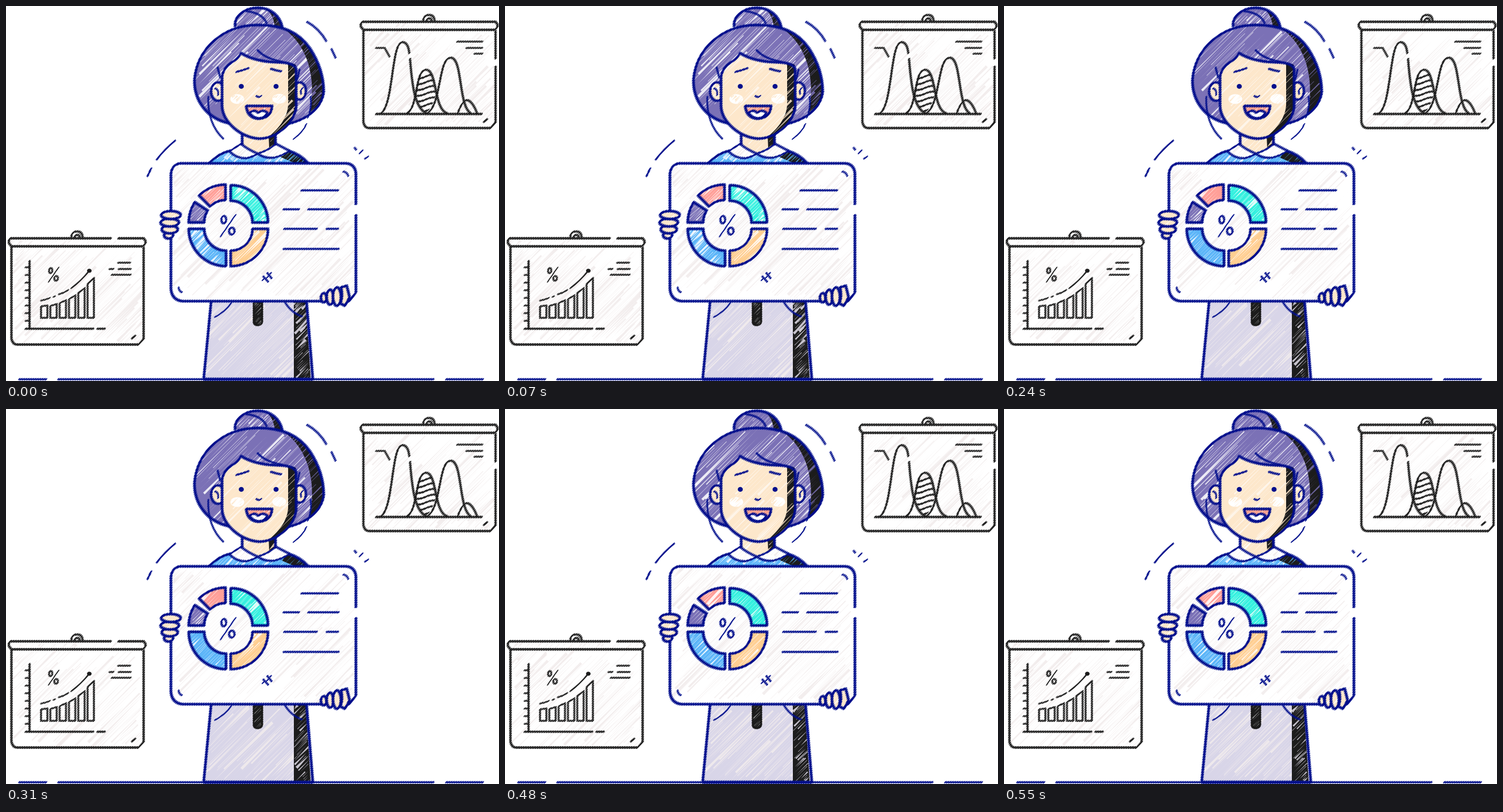
Recreate the animation shown at these times as an HTML page with a canvas. Size 858 by 653 pixels, loop 0.6 s.

```html
<!DOCTYPE html>
<html lang="en">
<head>
<meta charset="utf-8">
<title>Scribbled presentation</title>
<style>
html, body { margin: 0; width: 100%; height: 100%; overflow: hidden; background: #fff; }
canvas { display: block; width: 858px; height: 653px; }
</style>
</head>
<body>
<canvas id="stage" width="858" height="653"></canvas>
<script>
const ctx = document.getElementById('stage').getContext('2d');
const STEP = 120, STEPS = 5;
const NAVY = '#000f8c', INK = '#1c1c1c', HAIR = '#7b71b6', SKIN = '#fde7cb';
const BLUE = '#5cb5f8', PALE = '#f1ebeb', WHITE = '#fff';
const density = [1.3, 1, .95, .95, 1.05];
let rand, busy;

function seeded(a) {
  return () => {
    a = a + 0x6D2B79F5 | 0;
    let t = Math.imul(a ^ a >>> 15, 1 | a);
    t = t + Math.imul(t ^ t >>> 7, 61 | t) ^ t;
    return ((t ^ t >>> 14) >>> 0) / 4294967296;
  };
}

// Diagonal stripes give every pen line its serrated edge.
function stripes(color) {
  const c = document.createElement('canvas');
  c.width = c.height = 4;
  const g = c.getContext('2d');
  g.strokeStyle = color;
  g.lineWidth = 1.7;
  for (let k = -4; k <= 8; k += 4) {
    g.beginPath();
    g.moveTo(k - 4, 8);
    g.lineTo(k + 8, -4);
    g.stroke();
  }
  return ctx.createPattern(c, 'repeat');
}
const pens = { [NAVY]: stripes(NAVY), [INK]: stripes(INK) };

function line(d, color = NAVY, w = 4) {
  const p = new Path2D(d);
  ctx.lineCap = 'butt';
  ctx.lineJoin = 'round';
  ctx.strokeStyle = color;
  ctx.lineWidth = Math.max(1.2, w - 1.4);
  ctx.stroke(p);
  // Sweep the stripes along their own direction, so the teeth lean at 45°.
  ctx.strokeStyle = pens[color];
  ctx.lineWidth = w;
  for (const shift of [-.8, .8]) {
    ctx.save();
    ctx.translate(shift, -shift);
    ctx.stroke(p);
    ctx.restore();
  }
}

function bounds(d) {
  const n = d.match(/-?\d+(\.\d+)?/g).map(Number);
  const xs = n.filter((_, i) => i % 2 === 0), ys = n.filter((_, i) => i % 2);
  return [Math.min(...xs), Math.min(...ys), Math.max(...xs), Math.max(...ys)];
}

// Flat colour with fine tapered diagonal gaps, re-drawn at every step.
function fill(d, color, gap = WHITE, amount = 1, alpha = .85) {
  const [x0, y0, x1, y1] = bounds(d), path = new Path2D(d);
  ctx.save();
  ctx.fillStyle = color;
  ctx.fill(path);
  ctx.clip(path);
  ctx.fillStyle = gap;
  ctx.globalAlpha = alpha;
  const pitch = 4.6 / (amount * busy);
  for (let s = x0 + y0; s < x1 + y1; s += pitch * (.4 + 1.2 * rand())) {
    const a = Math.max(x0, s - y1), b = Math.min(x1, s - y0);
    const len = (b - a) * (.45 + .55 * rand());
    const from = a + (b - a - len) * rand();
    const w = .25 + 1.6 * rand() ** 4;
    const [thin, wide] = rand() < .5 ? [from, from + len] : [from + len, from];
    ctx.beginPath();
    ctx.moveTo(thin, s - thin);
    ctx.lineTo(wide - w, s - wide - w);
    ctx.lineTo(wide + w, s - wide + w);
    ctx.fill();
  }
  ctx.restore();
}

function shape(d, color, gap, amount, pen = NAVY, w = 4) {
  fill(d, color, gap, amount);
  line(d, pen, w);
}

const seg = (x1, y1, x2, y2) => `M${x1} ${y1} L${x2} ${y2}`;
const row = (y, ...xs) => {
  let d = '';
  for (let i = 0; i < xs.length; i += 2) d += seg(xs[i], y, xs[i + 1], y);
  return d;
};

function oval(x, y, rx, ry) {
  const k = .552, a = rx * k, b = ry * k;
  return `M${x - rx} ${y} C${x - rx} ${y - b} ${x - a} ${y - ry} ${x} ${y - ry}` +
    ` C${x + a} ${y - ry} ${x + rx} ${y - b} ${x + rx} ${y}` +
    ` C${x + rx} ${y + b} ${x + a} ${y + ry} ${x} ${y + ry}` +
    ` C${x - a} ${y + ry} ${x - rx} ${y + b} ${x - rx} ${y}Z`;
}

function dot(x, y, rx, ry, color) {
  ctx.fillStyle = color;
  ctx.fill(new Path2D(oval(x, y, rx, ry)));
}

function sector(x, y, from, to, R = 65, r = 38) {
  const pts = [];
  const add = (rad, deg) => {
    const t = deg * Math.PI / 180;
    pts.push((x + rad * Math.cos(t)).toFixed(1) + ' ' + (y + rad * Math.sin(t)).toFixed(1));
  };
  for (let i = 0; i <= 16; i++) add(R, from + (to - from) * i / 16);
  for (let i = 16; i >= 0; i--) add(r, from + (to - from) * i / 16);
  return 'M' + pts.join(' L') + 'Z';
}

function percent(x, y, s, pen, w) {
  line(oval(x - 7 * s, y - 10 * s, 4.2 * s, 6.5 * s), pen, w);
  line(oval(x + 7 * s, y + 10 * s, 4.8 * s, 6 * s), pen, w);
  line(seg(x - 13 * s, y + 20 * s, x + 14 * s, y - 19 * s), pen, w - 1);
}

function bun() {
  const d = 'M399 36 C396 20 413 3 438 3 C460 3 477 17 481 38 L440 33Z';
  fill(d, HAIR);
  fill('M454 5 C468 11 478 22 481 38 L468 36 C466 22 462 14 454 5Z', INK, HAIR, .7);
  line('M399 36 C396 20 413 3 438 3 C460 3 477 17 481 38');
  line('M418 9 Q447 12 454 31', NAVY, 2.5);
}

function hair() {
  const d = 'M388 204 C350 196 327 165 328 128 C333 72 380 33 438 33 ' +
    'C482 33 510 46 529 74 C546 100 553 126 553 150 C549 180 520 200 487 206Z';
  fill(d, HAIR);
  fill('M484 40 C510 48 526 66 538 92 C548 112 553 132 553 152 L547 172 ' +
    'L528 190 C535 155 534 128 526 100 C518 75 505 55 484 40Z', INK, HAIR, .7);
  line(d);
}

function head() {
  shape(oval(369, 149, 12, 16), SKIN, WHITE, .4, NAVY, 3.6);
  shape(oval(511, 148, 11, 15), SKIN, WHITE, .4, NAVY, 3.6);
  line('M363 143 Q371 145 369 156 M517 142 Q511 146 514 154', NAVY, 2);
  // Neck and clothes sit below the chin.
  fill('M353 274 Q371 255 398 248 L486 248 Q511 256 526 274Z', BLUE, WHITE, 1.2);
  fill('M478 263 L495 252 Q513 260 525 274 L503 274Z', INK, BLUE, .6);
  line('M353 274 Q371 256 390 252 M491 252 Q512 258 526 274');
  fill('M411 215 L469 215 L469 242 L438 257 L411 242Z', SKIN, WHITE, .4);
  fill('M457 222 L469 215 L469 242 L458 247Z', INK, SKIN, .4);
  shape('M409 240 L389 253 Q401 266 419 265 Q431 262 438 257 Q450 266 467 264 ' +
    'Q483 260 493 252 L470 240 Q456 252 438 257 Q421 250 409 240Z', WHITE, PALE, .7, NAVY, 3);
  line('M411 219 L411 242 M469 219 L469 242');

  const face = 'M376 122 Q379 107 393 98 Q404 92 409 82 Q433 97 472 98 ' +
    'Q502 98 505 110 L505 176 C501 206 469 231 440 231 C406 228 377 201 376 174Z';
  fill(face, SKIN, WHITE, .65, .6);
  fill('M491 99 L504 102 L505 176 C501 202 476 226 454 230 C474 215 490 195 491 172Z', INK, SKIN, .7);
  line(face);
  line('M437 76 Q451 92 481 97 M368 106 L373 125 M511 110 L507 128', NAVY, 2.5);

  fill(oval(402.5, 162, 12, 8.5), WHITE, SKIN, .9);
  fill(oval(475.5, 161.5, 12, 8.5), WHITE, SKIN, .9);
  line('M400 115 L411 112 L423 108 M460 109 L470 112 L480 114', NAVY, 3);
  dot(409.5, 140, 4.4, 4.2, NAVY);
  dot(470, 140, 4.4, 4.2, NAVY);
  line('M435 156 Q440 161 445 156', NAVY, 2.2);
  const mouth = 'M418 174 L463 174 Q462 195 440 196 Q420 195 418 174Z';
  fill(mouth, '#f6a08f', WHITE, .7);
  shape('M424 186 Q432 179 439 186 Q447 179 455 186 Q449 196 440 196 Q430 196 424 186Z', WHITE, PALE, .5, NAVY, 3.4);
  line(mouth, NAVY, 4);
}

function accents() {
  line('M352 157 Q350 205 379 232', NAVY, 2);
  line('M530 157 Q533 177 525 195 M523 205 Q517 220 500 232', NAVY, 2);
  line('M523 27 Q545 39 558 62 M566 74 L574 91', NAVY, 2.6);
  line('M295 234 Q276 249 262 268 M253 282 L246 297', NAVY, 3);
  line('M606 246 L610 251 M615 257 L621 251 M624 266 L631 262', NAVY, 2.6);
}

function apron() {
  fill('M357 514 L523 514 L534 650 L344 650Z', '#d8d5e8', '#f2edee', 1.15);
  fill('M501 514 L522 514 L530 648 L501 648Z', INK, '#e5e1ed', .95);
  line('M357 514 L344 650 M523 514 L534 650');
  line('M344 650 L535 650', NAVY, 5);
  fill('M430 514 L447 514 L447 551 Q445 557 438 557 Q431 557 430 551Z', INK, '#aaa', .7);
  line('M431 516 L431 551 Q433 556 438 556 Q445 556 446 551 L446 516', INK, 2);
  line('M393 516 Q381 533 363 542 M485 515 Q496 534 516 541', NAVY, 2.2);
}

function board() {
  fill('M302 274 L593 274 Q609 276 609 291 L609 498 L598 513 L306 514 Q287 512 287 493 L287 290 Q290 276 302 274Z',
    WHITE, PALE, 1.2);
  line('M609 346 L609 291 Q607 275 592 274 L303 274 Q289 276 287 292 L287 493 ' +
    'Q289 512 307 514 L597 514 L609 499 L609 363');
  line('M586 288 Q594 289 596 297 M300 489 Q301 497 307 499', NAVY, 2.2);

  shape(sector(391, 377, -90, 0), '#35f0df', WHITE, .9);
  shape(sector(391, 388, 0, 90), '#ffce91', WHITE, .9);
  shape(sector(383, 388, 90, 180), BLUE, WHITE, .9);
  shape(sector(383, 377, 180, 213), HAIR, WHITE, .9);
  shape(sector(382, 376, 225, 270), '#ff9f98', WHITE, .9);
  percent(386, 382, 1, NAVY, 3);
  line('M454 464 L463 475 M447 470 L457 481', NAVY, 2.4);
  line('M446 478 L450 474 M453 474 L457 470 M459 467 L462 464', NAVY, 2);
  line(row(321, 513, 579) + row(354, 482, 511, 525, 580) +
    row(388, 483, 542, 557, 579) + row(423, 482, 580), NAVY, 3);
}

function hands() {
  for (const [x, y, rx, ry] of [[283, 399, 8, 6], [285, 389, 14, 7], [285, 377, 16, 7], [287, 364, 17, 7]])
    shape(oval(x, y, rx, ry), SKIN, WHITE, .3);
  for (const [x, y, rx, ry] of [[553, 508, 5, 8], [564, 507, 6, 13], [576, 506, 7, 16]])
    shape(oval(x, y, rx, ry), SKIN, WHITE, .3);
  shape('M583 490 L593 487 L598 507 L590 522 L582 518 Q587 505 583 490Z', SKIN, WHITE, .3);
}

// Hanging screen; x and y place the top bar's upper left corner.
function screen(x, y, top, sides) {
  const at = (a, b) => `${x + a} ${y + b}`;
  fill(`M${at(5, 15)} L${at(235, 15)} L${at(235, 175)} L${at(226, 185)} L${at(14, 185)} L${at(5, 176)}Z`,
    WHITE, PALE, 1.2);
  fill(`M${at(0, 0)} L${at(238, 0)} L${at(238, 15)} L${at(0, 15)}Z`, WHITE, PALE, .5);
  line(`M${at(top[0], 0)} L${at(3, 0)} Q${at(-1, 4)} ${at(1, 9)} L${at(5, 14)} L${at(233, 14)} ` +
    `Q${at(240, 10)} ${at(238, 4)} L${at(235, 0)} L${at(top[1], 0)}`, INK, 3.2);
  line(`M${at(5, 15)} L${at(5, 175)} Q${at(7, 185)} ${at(15, 185)} L${at(226, 185)} L${at(235, 175)} ` +
    `L${at(235, sides[1])} M${at(235, sides[0])} L${at(235, 15)}`, INK, 3.2);
  line(`M${at(109, 0)} Q${at(109, -12)} ${at(119, -12)} Q${at(129, -12)} ${at(129, 0)}` +
    `M${at(115, -1)} Q${at(115, -6)} ${at(120, -6)} Q${at(124, -5)} ${at(124, -1)}`, INK, 2.8);
  line(`M${at(214, 175)} L${at(221, 169)}`, INK, 3);
}

function barChart() {
  screen(4.5, 404.5, [179, 190], [90, 90]);
  line('M41 443 L41 562', INK, 3);
  for (let i = 0; i < 8; i++) line(row(455 + i * 13.3, 33, 41), INK, 2.2);
  line(row(562, 33, 153, 158, 173), INK, 3);
  [522, 520, 514, 506, 494, 477].forEach((y, i) => {
    const x = 61 + i * 16.2, rise = 1 + i * 1.2;
    line(`M${x} 543 L${x} ${y + rise} L${x + 11} ${y - rise / 2} L${x + 11} 543Z`, INK, 2.5);
  });
  line('M60 513 Q69 512 77 508 M82 507 L86 505 M91 502 Q101 500 109 494 M113 492 Q131 478 144 462', INK, 2.2);
  dot(145, 461, 4, 3.5, INK);
  percent(82.5, 467.5, .68, INK, 2.4);
  line(row(447, 194, 217) + row(458, 179, 188, 195, 218) + row(468, 183, 218), INK, 2.4);
}

function curveChart() {
  screen(617, 27.5, [120, 120], [65, 77]);
  const lobe = 'M731 111 C742 111 747 130 749 151 Q743 175 731 187 Q717 176 712 151 C716 130 720 111 731 111Z';
  ctx.save();
  ctx.clip(new Path2D(lobe));
  for (let y = 123; y < 195; y += 10)
    line(`M708 ${y + 3} Q720 ${y + 5} 730 ${y} T752 ${y - 4}`, INK, 2.8);
  ctx.restore();
  line('M652 187 C675 174 670 63 690 63 Q700 63 702 83 M703 91 C706 121 708 177 732 187', INK, 3);
  line('M697 187 C718 179 711 111 731 111 C751 111 744 180 768 187', INK, 3);
  line('M733 187 C758 173 752 90 774 90 C795 90 787 174 809 187', INK, 3);
  line('M786 187 Q795 163 803 164 Q812 166 820 187', INK, 2.8);
  line(row(188, 643, 829), INK, 3.6);
  line('M643 73 L659 73 L668 89', INK, 2.3);
  line(row(62, 784, 830) + row(73, 800, 830) + row(83, 814, 830), INK, 2.3);
}

function draw(step) {
  rand = seeded(41 + step * 977);
  busy = density[step];
  ctx.fillStyle = WHITE;
  ctx.fillRect(0, 0, 858, 653);
  line(row(650, 22, 71, 90, 745, 765, 831), NAVY, 3);
  barChart();
  curveChart();
  bun();
  hair();
  head();
  accents();
  apron();
  board();
  hands();
}

const start = performance.now();
let shown = -1;
function tick() {
  const step = Math.floor((performance.now() - start) / STEP) % STEPS;
  if (step !== shown) draw(shown = step);
  requestAnimationFrame(tick);
}
tick();
</script>
</body>
</html>
```
